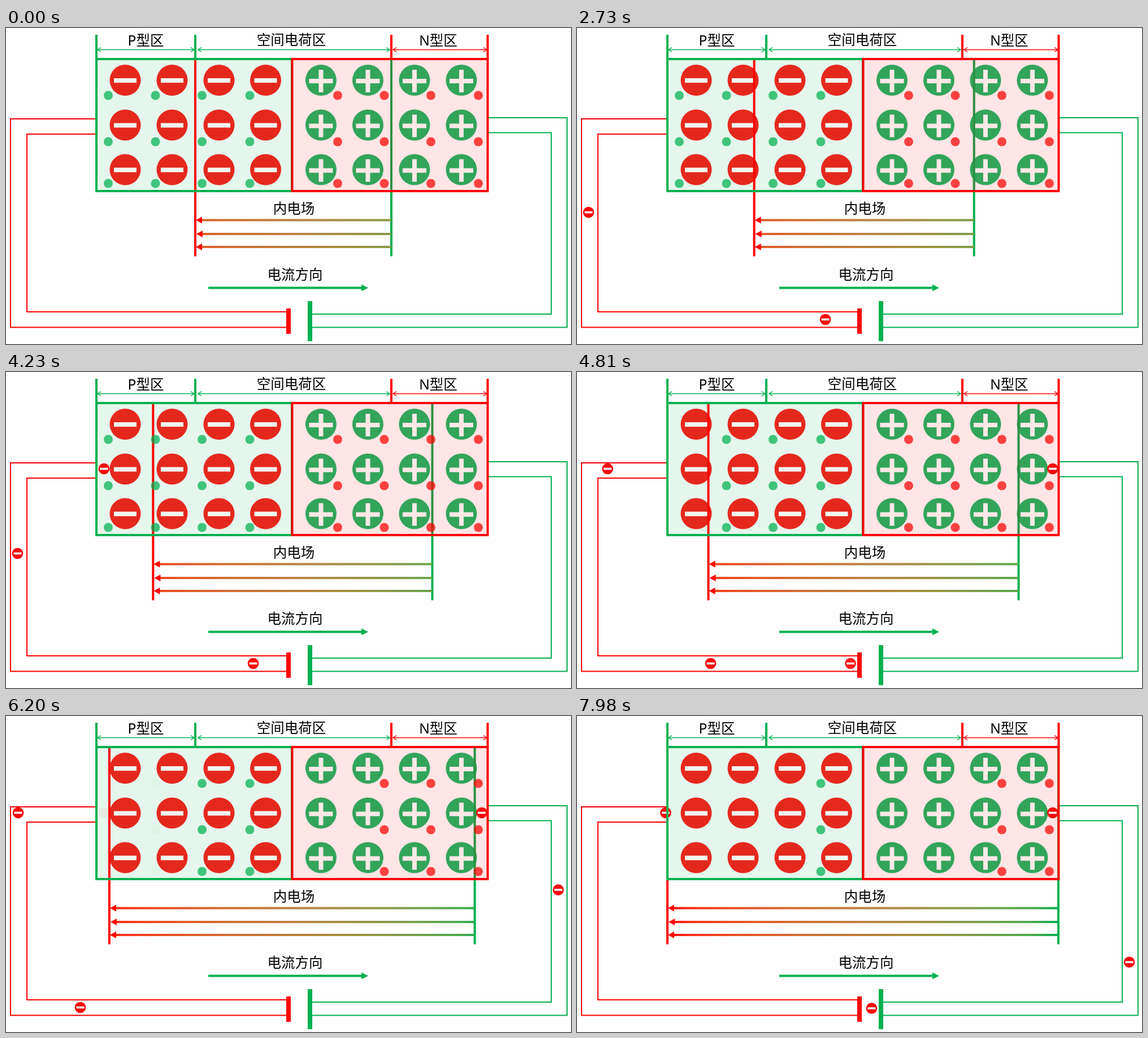
These frames come from a looping animation (1000x560 px, 8000 ms). An HTML page with a canvas:

```html
<!DOCTYPE html>
<html lang="zh">
<head>
<meta charset="utf-8">
<style>
html, body { margin: 0; width: 100%; height: 100%; overflow: hidden; background: #fefefe; }
canvas { display: block; }
</style>
</head>
<body>
<canvas id="stage" width="1000" height="560"></canvas>
<script>
const ctx = document.getElementById('stage').getContext('2d');
const LOOP = 8000, RED = '#ff0000', GREEN = '#00b050';
const ROWS = [92.5, 172, 251], DOT_ROWS = [119.5, 201.5, 275.5];
const P_IONS = [211, 294, 377, 459.5], N_IONS = [557.5, 640.5, 723, 806];
const HOLES = [181, 264.5, 347, 431.5], FREE = [587, 669.5, 752, 836];
const HOLE_FADES = [4235, 5720, 7210], FREE_FADES = [5200, 6590];

// Electron routes: corner points, time per leg, start times.
const ROUTES = [
  { points: [[484, 516.5], [20.5, 516.5], [20.5, 171.5], [173.5, 171.5]],
    legs: [1400, 1010, 880], starts: [813, 2298, 3788, 4980] },
  { points: [[842, 171.5], [977.5, 171.5], [977.5, 518], [521.5, 518]],
    legs: [937, 1040, 1050], starts: [4890, 6280, 8000] }
];
const LEG_EASE = [u => u * u, u => u + 0.15 * u * (1 - u), u => 1 - (1 - u) ** 2];

const clamp = v => Math.min(1, Math.max(0, v));
const ramp = (t, from, length) => clamp((t - from) / length);
const inOut = u => u < 0.5 ? 2 * u * u : 1 - 2 * (1 - u) ** 2;

function line(points, color, width) {
  ctx.strokeStyle = color;
  ctx.lineWidth = width;
  ctx.beginPath();
  points.forEach(([x, y]) => ctx.lineTo(x, y));
  ctx.stroke();
}

function disc(x, y, r, color) {
  ctx.fillStyle = color;
  ctx.beginPath();
  ctx.arc(x, y, r, 0, Math.PI * 2);
  ctx.fill();
}

function bar(x, y, w, h, color) {
  ctx.fillStyle = color;
  ctx.fillRect(x - w / 2, y - h / 2, w, h);
}

// Solid arrowhead; a negative length points left.
function head(x, y, length, half, color) {
  ctx.fillStyle = color;
  ctx.beginPath();
  ctx.moveTo(x, y);
  ctx.lineTo(x - length, y - half);
  ctx.lineTo(x - length, y + half);
  ctx.fill();
}

function dimension(x1, x2, color) {
  const y = 38.5;
  line([[x1, y], [x2, y]], color, 1.4);
  for (const [x, d] of [[x1, 6], [x2, -6]])
    line([[x + d, y - 4], [x, y], [x + d, y + 4]], color, 1.4);
}

function label(text, x, y) {
  ctx.fillStyle = '#000';
  ctx.fillText(text, x, y);
}

// Blend in linear light, so the middle stays bright.
const fieldGradient = ctx.createLinearGradient(160, 0, 852, 0);
for (let i = 0; i <= 16; i++) {
  const u = i / 16, g = 1 / 2.2;
  const rgb = [255 * (1 - u) ** g, 176 * u ** g, 80 * u ** g].map(Math.round);
  fieldGradient.addColorStop(u, `rgb(${rgb})`);
}

function drawIons() {
  for (const y of ROWS) {
    for (const x of P_IONS) {
      disc(x, y, 27.5, '#e5281e');
      bar(x, y + 0.5, 40, 8, '#f0f8ee');
    }
    for (const x of N_IONS) {
      disc(x, y, 27.5, '#32a559');
      bar(x, y + 1.5, 42, 8, '#fde8e6');
      bar(x, y + 1.5, 8, 40, '#fde8e6');
    }
  }
}

function drawDots(t, columns, fades, color) {
  columns.forEach((x, i) => {
    ctx.globalAlpha = 0.72 * (i < fades.length ? 1 - ramp(t, fades[i], 500) : 1);
    DOT_ROWS.forEach(y => disc(x, y, 8, color));
  });
  ctx.globalAlpha = 1;
}

function drawElectron(route, age) {
  const total = route.legs.reduce((a, b) => a + b);
  const alpha = Math.min(ramp(age, -630, 500), 1 - ramp(age, total + 135, 500));
  if (alpha <= 0) return;
  let time = clamp(age / total) * total, i = 0;
  while (i < 2 && time > route.legs[i]) time -= route.legs[i++];
  const k = LEG_EASE[i](time / route.legs[i]);
  const [a, b] = [route.points[i], route.points[i + 1]];
  const x = a[0] + (b[0] - a[0]) * k, y = a[1] + (b[1] - a[1]) * k;
  ctx.globalAlpha = alpha;
  disc(x, y, 9.8, '#f8080a');
  bar(x, y, 14, 3.6, '#fff');
  ctx.globalAlpha = 1;
}

function drawField(left, right) {
  line([[left, 57], [left, 404.5]], RED, 4);
  line([[right, 57], [right, 404.5]], GREEN, 4);
  [340.5, 365, 388].forEach((y, i) => {
    const tip = left + (i === 1 ? 2 : 1);
    line([[tip + 9, y], [right, y]], fieldGradient, 4);
    head(tip, y, -11, 6, RED);
  });
}

function drawCircuit() {
  line([[158, 161], [8, 161], [8, 530.5], [497, 530.5]], RED, 2);
  line([[158, 188], [37, 188], [37, 503], [497, 503]], RED, 2);
  line([[854, 159], [993, 159], [993, 530.5], [541, 530.5]], GREEN, 2);
  line([[854, 185.5], [965, 185.5], [965, 507], [541, 507]], GREEN, 2);
  bar(500, 519.5, 8, 45, RED);
  bar(538, 519.5, 8, 71, GREEN);
  line([[358, 460.5], [631, 460.5]], GREEN, 4);
  head(641, 460.5, 12, 6, GREEN);
}

function drawFrames() {
  ctx.lineWidth = 4;
  ctx.strokeStyle = GREEN;
  ctx.strokeRect(160, 55, 346, 234);
  line([[160, 12], [160, 55]], GREEN, 4);
  line([[335, 12], [335, 55]], GREEN, 4);
  ctx.lineWidth = 4;
  ctx.strokeStyle = RED;
  ctx.strokeRect(506.5, 55, 346, 234);
  line([[682, 12], [682, 55]], RED, 4);
  line([[852.5, 12], [852.5, 55]], RED, 4);
  dimension(162, 333, GREEN);
  dimension(340, 679, GREEN);
  dimension(685, 851, RED);
}

function draw(t) {
  ctx.fillStyle = '#fefefe';
  ctx.fillRect(0, 0, 1000, 560);
  const spread = inOut(ramp(t, 1005, 6985));

  ctx.fillStyle = '#e5f6ec';
  ctx.fillRect(160, 55, 346, 234);
  ctx.fillStyle = '#ffe5e5';
  ctx.fillRect(506, 55, 346, 234);
  drawIons();
  drawField(335 - 175 * spread, 682 + 170 * spread);

  // The pink zone lies as a thin veil over the moving line.
  ctx.save();
  ctx.beginPath();
  ctx.rect(680 + 170 * spread, 57, 4, 230);
  ctx.clip();
  ctx.fillStyle = 'rgba(255,0,0,0.18)';
  ctx.fillRect(506, 55, 346, 234);
  ctx.restore();

  drawDots(t, HOLES, HOLE_FADES, GREEN);
  drawDots(t, FREE, FREE_FADES, RED);
  for (const route of ROUTES)
    for (const start of route.starts) drawElectron(route, t - start);
  drawCircuit();
  drawFrames();

  ctx.font = '24.5px "Noto Sans", "Noto Sans CJK SC", sans-serif';
  ctx.textAlign = 'center';
  label('P型区', 247.5, 31);
  label('空间电荷区', 505, 29.5);
  label('N型区', 765, 31);
  label('内电场', 509.5, 329);
  label('电流方向', 511.5, 445.5);
}

function tick() {
  draw(performance.now() % LOOP);
  requestAnimationFrame(tick);
}
tick();
</script>
</body>
</html>
```
